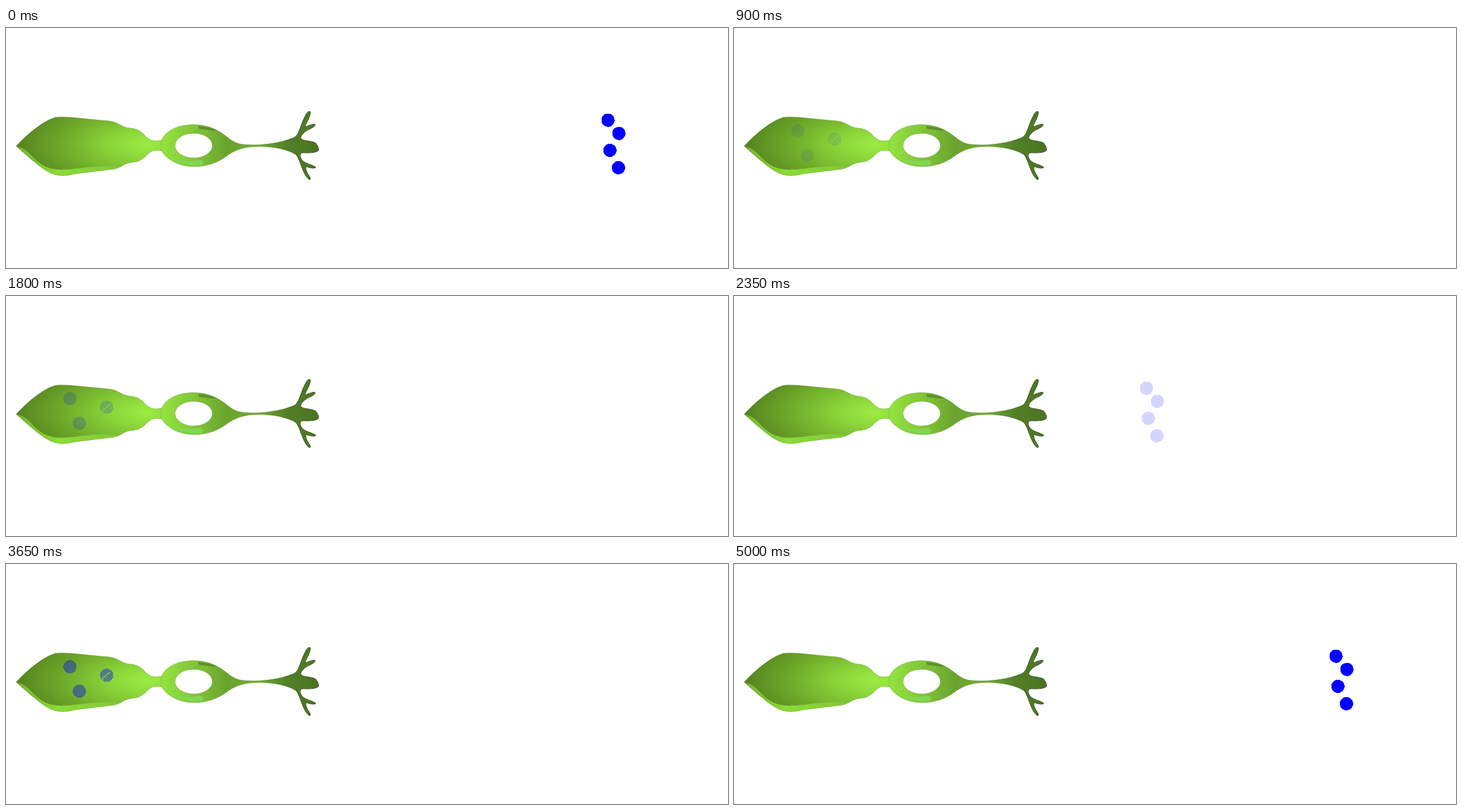
Animation of 1200x400 px, one loop 5050 ms. Source, as an HTML page:

```html
<!DOCTYPE html>
<html lang="en">
<head>
<meta charset="utf-8">
<title>Light reaching a cone cell</title>
<style>
  html, body { margin: 0; width: 100%; height: 100%; overflow: hidden; background: #fff; }
  svg { display: block; width: 1200px; height: 400px; }
  #cell { filter: blur(.4px); }
  circle { shape-rendering: crispEdges; }
</style>
</head>
<body>
<svg viewBox="0 0 1200 400">
  <defs>
    <radialGradient id="segment" gradientUnits="userSpaceOnUse" cx="0" cy="0" r="1"
      gradientTransform="translate(234 194) scale(226 92)">
      <stop offset="0" stop-color="#9cec42"/>
      <stop offset=".3" stop-color="#88d238"/>
      <stop offset=".65" stop-color="#6da729"/>
      <stop offset="1" stop-color="#517e1e"/>
    </radialGradient>
    <linearGradient id="lip" gradientUnits="userSpaceOnUse" x1="18" y1="0" x2="190" y2="0">
      <stop offset="0" stop-color="#74b22d"/>
      <stop offset=".4" stop-color="#8bdb38"/>
      <stop offset="1" stop-color="#82c836"/>
    </linearGradient>
    <linearGradient id="stem" gradientUnits="userSpaceOnUse" x1="258" y1="0" x2="520" y2="0">
      <stop offset="0" stop-color="#94e340"/>
      <stop offset=".2" stop-color="#82c838"/>
      <stop offset=".42" stop-color="#69a42e"/>
      <stop offset=".62" stop-color="#73ab38"/>
      <stop offset=".8" stop-color="#527f25"/>
      <stop offset="1" stop-color="#4b7423"/>
    </linearGradient>
    <linearGradient id="edge" gradientUnits="userSpaceOnUse" x1="258" y1="0" x2="520" y2="0">
      <stop offset="0" stop-color="#6b8f45" stop-opacity=".4"/>
      <stop offset=".72" stop-color="#5f8538" stop-opacity=".45"/>
      <stop offset=".87" stop-color="#1d3208" stop-opacity=".7"/>
    </linearGradient>
  </defs>

  <g id="cell">
    <path fill="url(#segment)" stroke="#6b8f45" stroke-opacity=".4"
      d="M17 197C38 173 66 153 82 149Q92 147 120 150L172 155C188 157 192 166 208 167
         C230 169 231 187 247 188L266 187V205L248 204C234 205 232 223 210 224
         C194 225 192 235 173 236L116 243Q96 248 84 245C64 241 39 216 17 197Z"/>
    <path fill="url(#lip)"
      d="M19 198C28 199 35 204 42 212C58 230 72 236 92 236C125 236 142 228 188 231
         Q182 235 173 236L116 243Q96 248 84 245C64 241 39 216 19 198Z"/>

    <path fill="url(#stem)" fill-rule="evenodd" stroke="url(#edge)"
      d="M258 188C265 171 285 161 313 161C335 161 354 170 368 182C379 191 386 194 402 194.5
         C430 196 462 190 480 182C488 176 490 159 498 145Q503 136 506 140
         C506 149 499 157 497 165Q505 161 513 160Q516 163 506 168
         C496 172 489 180 490 184C494 189 508 187 515 192Q521 200 519 204
         C515 209 502 208 492 208C487 210 489 217 494 222C501 227 510 228 515 232
         Q514 236 499 231C497 238 503 244 506 250Q506 256 501 250
         C492 240 490 222 482 211C468 202 446 198 420 197.5C392 198 382 204 370 211
         C354 224 335 231 313 231C285 231 266 218 258 204Z
         M281 196A31 20.5 0 1 0 343 196A31 20.5 0 1 0 281 196Z"/>
    <path fill="#47772c" fill-opacity=".6" d="M320 163Q338 164 351 171Q338 171 320 168Z"/>
    <path fill="#80db57" fill-opacity=".8" d="M276 217Q294 224 325 220Q330 224 325 229Q296 232 276 217Z"/>
  </g>

  <g id="rays"></g>
  <g id="hits" fill="#00f">
    <path fill="none" stroke="#a6d858" stroke-width="1.4"
      d="M161 194V189L164 187L165 190M167 187L168 184L171 182L174 180"/>
  </g>
</svg>

<script>
const LOOP = 5050, SAMPLE = 50, STEP = 40, CYCLE = 25, HALF = 12;
const rays = document.getElementById('rays');
const hits = document.getElementById('hits');

function addDot(group, [cx, cy]) {
  const dot = document.createElementNS('http://www.w3.org/2000/svg', 'circle');
  dot.setAttribute('cx', cx);
  dot.setAttribute('cy', cy);
  dot.setAttribute('r', 11);
  group.prepend(dot);
}

[[1000.6, 153.7], [1018.6, 175.7], [1003.7, 203.9], [1017.9, 232.8]].forEach(p => addDot(rays, p));
[[106.3, 171.3], [167.3, 185.4], [122, 212]].forEach(p => addDot(hits, p));

// Fades are blended in linear light, so convert back to sRGB.
const toSrgb = v => v <= 0.0031308 ? 12.92 * v : 1.055 * v ** (1 / 2.4) - 0.055;

function draw(time) {
  const t = Math.floor((time % LOOP) / SAMPLE) * SAMPLE;
  const n = Math.floor(t / STEP) % CYCLE;
  const travelling = n < HALF;
  rays.style.display = travelling ? '' : 'none';
  hits.style.display = travelling ? 'none' : '';
  if (travelling) {
    const white = Math.round(255 * toSrgb(n / HALF));
    rays.setAttribute('transform', `translate(${-39.38 * n} 0)`);
    rays.setAttribute('fill', `rgb(${white},${white},255)`);
  } else {
    hits.setAttribute('opacity', 1 - toSrgb((n - HALF) / HALF));
  }
}

const start = performance.now();
function tick() {
  draw(performance.now() - start);
  requestAnimationFrame(tick);
}
tick();
</script>
</body>
</html>
```
